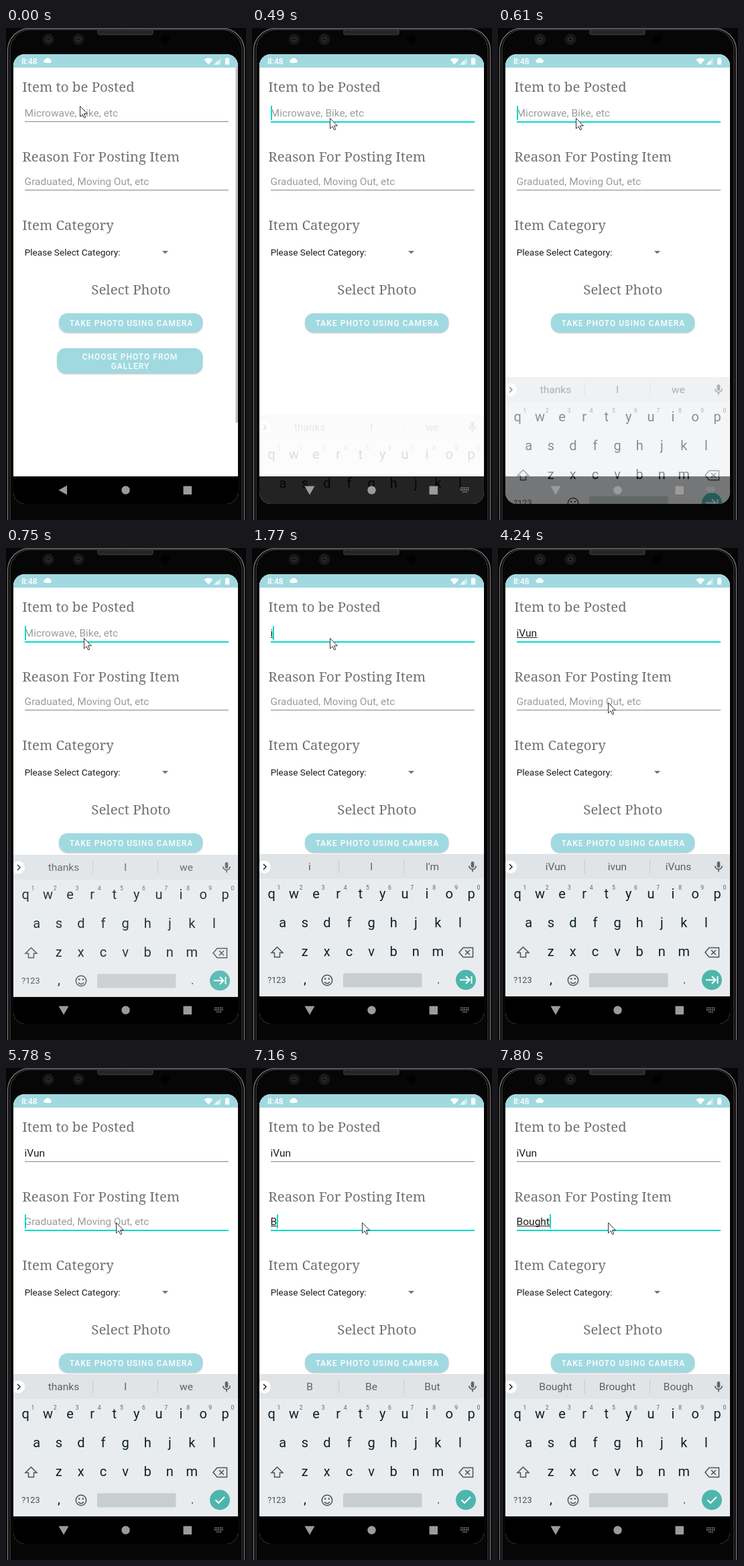
Recreate the animation shown at these times as an HTML page. Size 358 px wide and 733 px high, loop 8 s.

```html
<!DOCTYPE html>
<html lang="en">
<head>
<meta charset="utf-8">
<title>Posting form</title>
<style>
html, body { margin: 0; width: 100%; height: 100%; overflow: hidden; background: #000; }
svg { display: block; width: 358px; height: 733px; font-family: Roboto, sans-serif; }
.head { font: 20.46px "Noto Serif", serif; fill: #717171; }
.field { font-size: 15.5px; }
.btn { font-size: 11.94px; font-weight: 500; letter-spacing: 1.066px; fill: #fff; text-anchor: middle; }
.word { font-size: 15.5px; fill: #5a6166; text-anchor: middle; }
.key { font-size: 20px; fill: #102027; text-anchor: middle; }
.digit { font-size: 8.7px; fill: #5c646a; text-anchor: middle; }
.line { fill: none; stroke: #4a5358; stroke-width: 1.5; }
</style>
</head>
<body>
<svg viewBox="0 0 358 733">
  <defs>
    <clipPath id="screen"><rect x="11" y="39" width="335" height="670" rx="17"/></clipPath>
    <clipPath id="page"><rect id="pageBox" x="11" y="59" width="335" height="609"/></clipPath>
    <pattern id="mesh" width="3" height="3" patternUnits="userSpaceOnUse">
      <rect width="3" height="3" fill="#1c1c1c"/><circle cx="1.5" cy="1.5" r=".8" fill="#4a4a4a"/>
    </pattern>
    <filter id="soft" x="-10%" y="-30%" width="120%" height="160%"><feGaussianBlur stdDeviation=".9"/></filter>
  </defs>

  <!-- phone body -->
  <rect width="358" height="733" fill="#060606"/>
  <g fill="none">
    <rect x="2.500" y=".5" width="353" height="800" rx="33" stroke="#777" stroke-width="1.300"/>
    <rect x="6" y="2.500" width="346" height="800" rx="30" stroke="#484848"/>
  </g>
  <rect x="136.500" y="2.500" width="83" height="7.500" rx="3.500" fill="url(#mesh)" stroke="#444"/>
  <g fill="#17181a">
    <circle cx="63" cy="17" r="8.500"/><circle cx="108" cy="17" r="8.500"/>
    <circle cx="237.500" cy="17" r="6.500" fill="#010101"/>
  </g>
  <g fill="#303238">
    <circle cx="63" cy="17" r="3.500"/><circle cx="108" cy="17" r="3.500"/>
  </g>
  <g fill="#0b0b0d"><circle cx="63" cy="17" r="2"/><circle cx="108" cy="17" r="2"/></g>

  <g clip-path="url(#screen)">
    <rect x="11" y="39" width="335" height="670" fill="#fff"/>
    <rect x="11" y="39" width="335" height="20" fill="#a1d9e1"/>
    <g fill="#fff">
      <text x="23" y="53.700" font-size="12" font-weight="500">8:48</text>
      <path d="M59 52a2.600 2.600 0 0 1-.2-5.200a3.800 3.500 0 0 1 7-.1a2.700 2.700 0 0 1-.3 5.300z"/>
      <path d="M295.500 47q6.500-4.500 13 0l-6.500 7.500z"/>
      <path d="M310.500 54.500l10-10v10z" opacity=".5"/>
      <path d="M310.500 54.500l6-6v6z"/>
      <path d="M327 45.500h1.800v-1.300h2.600v1.300h1.800v9h-6.200z"/>
    </g>

    <!-- form -->
    <g clip-path="url(#page)">
      <text class="head" x="24.300" y="95">Item to be Posted</text>
      <text class="head" x="24.300" y="199">Reason For Posting Item</text>
      <text class="head" x="24.300" y="301">Item Category</text>
      <text class="head" x="186.300" y="397" text-anchor="middle">Select Photo</text>
      <g id="fields"></g>
      <text x="27.700" y="339" font-size="13.640" fill="#1c1c1c">Please Select Category:</text>
      <path d="M233 332h9l-4.500 4.500z" fill="#757575"/>
      <g fill="#000" opacity=".28" filter="url(#soft)">
        <rect x="79.500" y="427" width="213.500" height="27.500" rx="12.500"/>
        <rect x="76.500" y="479" width="216.500" height="36.500" rx="12.500"/>
      </g>
      <g fill="#a1d9e1">
        <rect x="79" y="425" width="214.500" height="28.500" rx="12.500"/>
        <rect x="76" y="477" width="217.500" height="37" rx="12.500"/>
      </g>
      <text class="btn" x="187" y="444">TAKE PHOTO USING CAMERA</text>
      <text class="btn" x="185" y="493.700">CHOOSE PHOTO FROM</text>
      <text class="btn" x="185.500" y="507.700">GALLERY</text>
      <rect id="scroll" x="342.500" y="59" width="3.500" height="529" fill="#bdbdbd"/>
    </g>

    <rect x="11" y="668" width="335" height="41" fill="#000"/>

    <!-- keyboard -->
    <g id="board">
      <rect x="11" y="456" width="335" height="212" fill="#e8ecef"/>
      <rect x="11" y="456" width="335" height="37" fill="#e0e4e7"/>
      <circle cx="18.500" cy="475" r="9.500" fill="#fff"/>
      <path class="line" d="M17 471l4 4-4 4" style="stroke:#222"/>
      <path d="M129.500 465v20M226.500 465v20" stroke="#c6cbce"/>
      <g id="words"></g>
      <rect x="326.700" y="467" width="4.600" height="9.500" rx="2.300" fill="#5f676c"/>
      <path class="line" d="M323.800 473.500a5.200 5.200 0 0 0 10.400 0M329 479v3.500" stroke-width="1.300"/>
      <g id="keys"></g>
      <path class="line" d="M37.500 594.500l-8.500 8.500h4.500v6.500h8v-6.500h4.500z"/>
      <path class="line" d="M309 602.500l6-7h14.500v14h-14.500zM318 599l7 7M325 599l-7 7"/>
      <text x="23.300" y="648" font-size="12.600" fill="#455057">?123</text>
      <circle class="line" cx="112" cy="644" r="7.700"/>
      <path class="line" d="M108 646.500q4 4.500 8 0"/>
      <g fill="#4a5358"><circle cx="109.200" cy="641.800" r="1.300"/><circle cx="114.800" cy="641.800" r="1.300"/></g>
      <rect x="136" y="633.500" width="117.500" height="21" rx="2" fill="#c8cdd0"/>
      <circle cx="319" cy="643.500" r="15" fill="#4db6ac"/>
      <path id="enter" fill="none" stroke="#fff" stroke-width="2"/>
    </g>

    <!-- navigation bar -->
    <g fill="#9b9b9b">
      <path id="back"/>
      <circle cx="178.500" cy="688.500" r="6.200"/>
      <rect x="264.500" y="682.500" width="12.500" height="12.500" rx=".8"/>
      <path id="dots" fill="none" stroke="#9b9b9b" stroke-width="1.600" stroke-dasharray="1.600 1.100"
        d="M311 685.300h13M311 688.100h13M314 691.200h7"/>
    </g>
  </g>

  <path id="mouse" d="M.5.5v15.500l3.600-3.400 2.500 5.300 2.200-1-2.400-5.200h5z" fill="#fff" stroke="#1c1c24" stroke-width=".9"/>
</svg>

<script>
const LOOP = 8000;
const $ = id => document.getElementById(id);

function add(parent, tag, attrs, text) {
  const el = document.createElementNS("http://www.w3.org/2000/svg", tag);
  for (const k in attrs) el.setAttribute(k, attrs[k]);
  if (text) el.textContent = text;
  parent.appendChild(el);
  return el;
}

// Value of the last step that has begun; each step is [time, value].
function at(steps, t) {
  let v = steps[0][1];
  for (const [time, value] of steps) if (t >= time) v = value;
  return v;
}

// Keyboard letters
[["qwertyuiop", 29.3, 522], ["asdfghjkl", 45.7, 565], ["zxcvbnm", 78.7, 608]].forEach(([row, x0, y], r) => {
  [...row].forEach((c, i) => {
    const x = x0 + i * 33.1;
    add($("keys"), "text", { class: "key", x, y }, c);
    if (r === 0) add($("keys"), "text", { class: "digit", x: x + 10.7, y: 509 }, String((i + 1) % 10));
  });
});
add($("keys"), "text", { class: "key", x: 79, y: 649 }, ",");
add($("keys"), "circle", { cx: 278, cy: 648, r: 1, fill: "#37434a" });

const words = [86, 178, 269].map(x => add($("words"), "text", { class: "word", x, y: 480 }));

function makeField(base, hint) {
  const g = $("fields");
  return {
    hint,
    text: add(g, "text", { class: "field", x: 27.6, y: base }),
    mark: add(g, "rect", { x: 28, y: base + 1, height: 1, fill: "#222" }),
    line: add(g, "rect", { x: 28, y: base + 7, width: 304 }),
    caret: add(g, "rect", { y: base - 16, width: 2, height: 21, fill: "#03dac5" })
  };
}
const item = makeField(132, "Microwave, Bike, etc");
const reason = makeField(234, "Graduated, Moving Out, etc");

const itemText = [[0, ""], [1770, "i"], [2170, "iV"], [2570, "iVu"], [2820, "iVun"]];
const reasonText = [[0, ""], [7160, "B"], [7410, "Bo"], [7530, "Bou"], [7650, "Boug"], [7800, "Bought"]];
const focus = [[0, null], [370, item], [4770, reason]];
const caretOn = [[0, true], [1370, false], [1770, true], [3220, false], [3710, true], [4240, false],
  [4770, true], [5280, false], [5780, true], [6290, false], [6790, true]];
const hints = [
  [0, "thanks I we"], [1770, "i I I'm"], [2290, "iV IV I'm"], [2570, "iVu ivu iVun"],
  [2820, "iVun ivun iVuns"], [4890, "thanks I we"], [7160, "B Be But"], [7410, "Bo Both Boy"],
  [7530, "Bou Bought Bound"], [7650, "Boug Bought Bough"], [7800, "Bought Brought Bough"]
];
const pointer = [[0, [110, 116]], [120, [116, 134]], [3470, [130, 160]], [3590, [156, 213]], [3710, [164, 230]]];
// [drop, opacity] of the keyboard as it slides in
const slide = [[0, [212, 0]], [490, [120, 0.15]], [610, [64, 0.5]], [750, [1, 0.9]], [870, [0, 1]]];

function drawField(f, value, active, blink) {
  f.text.textContent = value || f.hint;
  f.text.setAttribute("fill", value ? "#1c1c1c" : "#9c9c9c");
  const width = value ? f.text.getComputedTextLength() : 0;
  f.mark.setAttribute("width", active ? width : 0);
  f.line.setAttribute("height", active ? 2 : 1);
  f.line.setAttribute("fill", active ? "#03dac5" : "#858585");
  f.caret.setAttribute("x", Math.round(27.6 + width));
  f.caret.setAttribute("visibility", active && blink ? "visible" : "hidden");
}

function draw(t) {
  const active = at(focus, t), blink = at(caretOn, t), open = t >= 490;
  drawField(item, at(itemText, t), active === item, blink);
  drawField(reason, at(reasonText, t), active === reason, blink);

  at(hints, t).split(" ").forEach((w, i) => { words[i].textContent = w; });

  const [drop, alpha] = at(slide, t);
  $("board").setAttribute("transform", `translate(0 ${drop})`);
  $("board").setAttribute("opacity", alpha);
  $("pageBox").setAttribute("height", open ? 397 : 609);
  $("scroll").setAttribute("visibility", open ? "hidden" : "visible");
  $("dots").setAttribute("visibility", open ? "visible" : "hidden");
  $("back").setAttribute("d", open ? "M78.5 682.5h15l-7.5 13z" : "M78.5 688.5l12.500-7v14z");
  $("enter").setAttribute("d", t >= 4890
    ? "M312.5 643.5l4.5 4.5 9-9"
    : "M310 643.5h14M319 638l5.5 5.5-5.5 5.5M327.5 638v11");

  $("mouse").setAttribute("transform", `translate(${at(pointer, t)})`);
}

const start = performance.now();
function tick(now) {
  draw(Math.max(0, now - start) % LOOP);
  requestAnimationFrame(tick);
}
draw(0);
requestAnimationFrame(tick);
</script>
</body>
</html>
```
